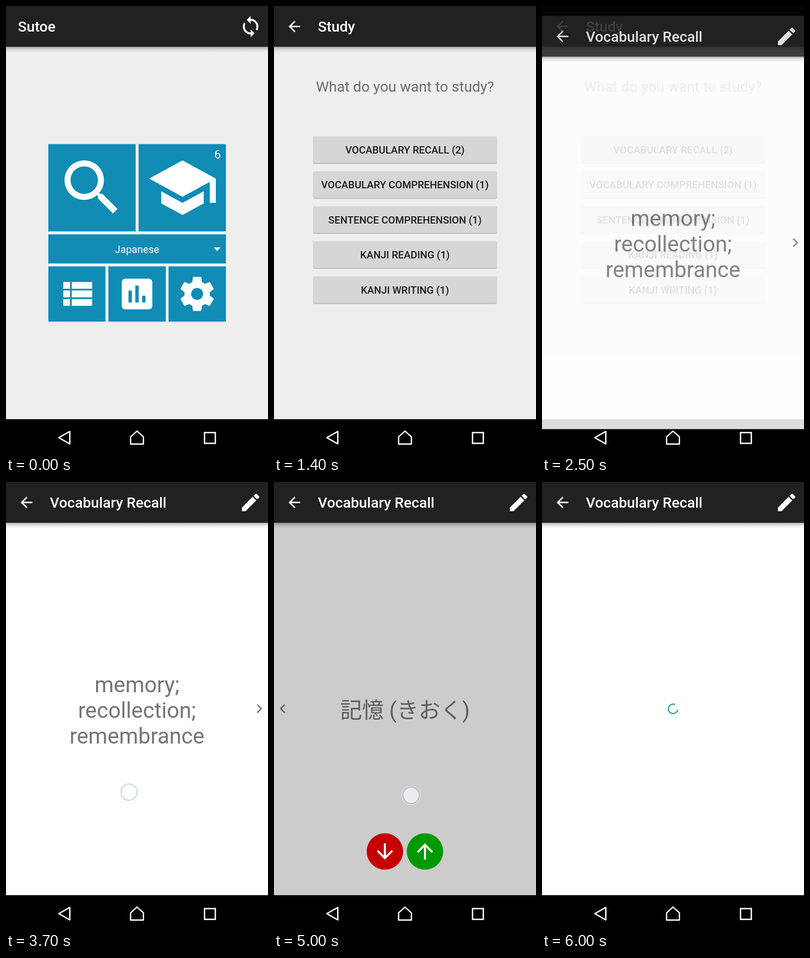
An HTML page that plays this animation: 573x978 px, repeating every 6.1 s.

```html
<!DOCTYPE html>
<html lang="ja">
<head>
<meta charset="utf-8">
<style>
  html, body { margin: 0; width: 100%; height: 100%; overflow: hidden; background: #000; }
  svg { display: block; font-family: Roboto, "Noto Sans CJK JP", "Noto Sans CJK", sans-serif; }
  .mid { text-anchor: middle; }
  .bold { font-weight: 500; }
  .line { fill: none; stroke-width: 3; }
</style>
</head>
<body>
<svg id="stage" width="573" height="978" viewBox="0 0 573 978"></svg>
<script>
const LOOP = 6100, STEP = 100, W = 573, BODY = 813;
const stage = document.getElementById('stage');

// Icons on a 24-unit grid
const ICONS = {
  back: 'M20 11H7.83l5.59-5.59L12 4l-8 8 8 8 1.41-1.41L7.83 13H20z',
  sync: 'M12 4V1L8 5l4 4V6c3.31 0 6 2.69 6 6 0 1.01-.25 1.97-.7 2.8l1.46 1.46C19.54 15.03 20 13.57 20 12c0-4.42-3.58-8-8-8zm0 14c-3.31 0-6-2.69-6-6 0-1.01.25-1.97.7-2.8L5.24 7.74C4.46 8.97 4 10.43 4 12c0 4.42 3.58 8 8 8v3l4-4-4-4z',
  edit: 'M3 17.25V21h3.75L17.81 9.94l-3.75-3.75zM20.71 7.04c.39-.39.39-1.02 0-1.41l-2.34-2.34c-.39-.39-1.02-.39-1.41 0l-1.83 1.83 3.75 3.75z',
  search: 'M15.5 14h-.79l-.28-.27C15.41 12.59 16 11.11 16 9.5 16 5.91 13.09 3 9.5 3S3 5.91 3 9.5 5.91 16 9.5 16c1.61 0 3.09-.59 4.23-1.57l.27.28v.79l5 4.99L20.49 19zm-6 0C7.01 14 5 11.99 5 9.5S7.01 5 9.5 5 14 7.01 14 9.5 11.99 14 9.5 14z',
  school: 'M5 13.18v4L12 21l7-3.82v-4L12 17zM12 3L1 9l11 6 9-4.91V17h2V9z',
  list: 'M4 5h4v4H4zm0 5h4v4H4zm0 5h4v4H4zM9 5h12v4H9zm0 5h12v4H9zm0 5h12v4H9z',
  chart: 'M19 3H5c-1.1 0-2 .9-2 2v14c0 1.1.9 2 2 2h14c1.1 0 2-.9 2-2V5c0-1.1-.9-2-2-2zM9 17H7v-7h2zm4 0h-2V7h2zm4 0h-2v-4h2z'
};

const icon = (name, cx, cy, scale, turn = 0) =>
  `<path d="${ICONS[name]}" fill="#fff" transform="translate(${cx} ${cy}) rotate(${turn}) scale(${scale}) translate(-12 -12)"/>`;
const rect = (x, y, w, h, fill, more = '') =>
  `<rect x="${x}" y="${y}" width="${w}" height="${h}" fill="${fill}" ${more}/>`;
const text = (s, x, y, size, fill, cls = '') =>
  `<text x="${x}" y="${y}" font-size="${size}" fill="${fill}" class="${cls}">${s}</text>`;
const tile = (x, y, w, h) => rect(x, y, w, h, '#108cb5');

const gear = (cx, cy, scale) => {
  let teeth = '';
  for (let a = 0; a < 360; a += 60)
    teeth += `<path d="M-2.9-6.7l.4-2.9q.1-.4.5-.4h4q.4 0 .5.4l.4 2.9z" fill="#fff" transform="rotate(${a})"/>`;
  return `<g transform="translate(${cx} ${cy}) scale(${scale})">
    <circle r="5.5" fill="none" stroke="#fff" stroke-width="4"/>${teeth}</g>`;
};

const header = (title, x) =>
  rect(0, -100, W, 100, '#000') + rect(0, 0, W, 89, '#212121') +
  rect(0, 89, W, 12, 'url(#shade)') + text(title, x, 56, 31.83, '#fff', 'bold') +
  (x > 50 ? icon('back', 44.7, 44.7, 1.59) : '');

const body = fill => rect(0, 89, W, BODY, fill);

const home = body('#eee') + header('Sutoe', 26) + icon('sync', 535, 45, 2.122) +
  tile(92.5, 301.5, 191, 190.5) + tile(290, 301.5, 191, 190.5) + tile(92.5, 498.5, 388.5, 63.5) +
  tile(92.5, 568.5, 125, 120.5) + tile(224, 568.5, 125.5, 120.5) + tile(355.5, 568.5, 125.5, 120.5) +
  icon('search', 187.7, 396.7, 6.63) + icon('school', 386, 396.7, 6.63) +
  text('6', 469.8, 333, 25.5, '#fff" text-anchor="end') +
  text('Japanese', 286.5, 539, 22.5, '#fff', 'mid') +
  '<path d="M454 527h15l-7.5 8z" fill="#fff"/>' +
  icon('list', 155, 628.5, 3.714) + icon('chart', 286.5, 628.8, 3.714) + gear(418, 628.5, 3.714);

const choices = ['VOCABULARY RECALL (2)', 'VOCABULARY COMPREHENSION (1)',
  'SENTENCE COMPREHENSION (1)', 'KANJI READING (1)', 'KANJI WRITING (1)'];
const study = body('#eee') + header('Study', 96) +
  text('What do you want to study?', 286.5, 187, 31.83, '#6d6d6d', 'mid') +
  choices.map((label, i) => {
    const y = 284.3 + i * 76.4;
    return rect(85, y + 1, 403, 60, '#000', 'rx="4" opacity=".1"') +
      rect(85.5, y + 1, 402, 58.8, '#000', 'rx="3.5" opacity=".12"') +
      rect(85, y, 403, 58, '#d6d6d6', 'rx="3"') +
      (i ? '' : rect(85, y, 403, 58, '#000', 'rx="3" id="press"')) +
      text(label, 286.5, y + 37.7, 22.28, '#1c1c1c', 'mid bold');
  }).join('');

const question = ['memory;', 'recollection;', 'remembrance']
  .map((s, i) => text(s, 286.5, 458.7 + i * 56, 47.75, '#757575', 'mid')).join('') +
  '<path class="line" stroke="#757575" d="M549.5 486l8.8 8.8-8.8 8.8"/>';

const disc = (cx, fill, turn) =>
  `<circle cx="${cx}" cy="806.5" r="39.8" fill="${fill}"/>` + icon('back', cx, 806.5, 2.22, turn);
const answer = body('#ccc') +
  text('記憶 (きおく)', 286.5, 514.5, 47.75, '#5e5e5e', 'mid') +
  '<path class="line" stroke="#5e5e5e" d="M23.5 486l-8.8 8.8 8.8 8.8"/>' +
  disc(242.5, '#c60000', -90) + disc(330.2, '#009a00', 90);

const recall = body('#fff') + `<g clip-path="url(#view)">
    <g id="question">${question}</g><g id="answer">${answer}</g>
    <circle id="spinner" cx="286.7" cy="495.2" r="10.4" fill="none" stroke="#148f8e" stroke-width="2.2" pathLength="360"/>
  </g>` + header('Vocabulary Recall', 96) + icon('edit', 535, 44.7, 2.122);

stage.innerHTML = `<defs>
    <linearGradient id="shade" x2="0" y2="1">
      <stop stop-opacity=".32"/><stop offset=".4" stop-opacity=".12"/><stop offset="1" stop-opacity="0"/>
    </linearGradient>
    <clipPath id="view">${body('#000')}</clipPath>
  </defs>
  <g>${home}</g><g id="study">${study}</g><g id="recall">${recall}</g>
  <g class="line" stroke="#fff" stroke-linejoin="round">
    <path d="M115.5 942.3L139.5 928.8V956z"/>
    <path d="M272.5 956.2V940.5L286.5 928l14 12.5V956.2z"/>
    <path d="M434.2 931.2h23.6v23.6h-23.6z" stroke-linejoin="miter"/>
  </g>
  <g id="touch">
    <circle r="20" fill="none" stroke="#fff" stroke-width="3" opacity=".25"/>
    <circle r="17.7" fill="#fff" fill-opacity=".65" stroke="#7891c8" stroke-opacity=".45" stroke-width="2"/>
  </g>`;

const el = id => document.getElementById(id);
const set = (id, attrs) => { for (const k in attrs) el(id).setAttribute(k, attrs[k]); };
const clamp = v => Math.min(1, Math.max(0, v));
const smooth = v => { v = clamp(v); return v * v * (3 - 2 * v); };

// A screen rises 78 px into place while fading in
function enter(id, age) {
  const y = 78 * (1 - clamp(age / 350)) ** 5;
  set(id, { opacity: 1 - (1 - clamp(age / 200)) ** 4, transform: `translate(0 ${y})` });
}

// Finger position and strength: [x, y, opacity]
function finger(t, swipe, lift) {
  if (t >= 800 && t < 1200) return [392, 383, t < 1100 ? .8 : .2];
  if (t >= 2100 && t < 2500) return [290, 318, t < 2400 ? .9 : .2];
  if (t >= 3700 && t < 3900) return [269 - swipe, 677, 1];
  if (t >= 5000 && t < 5300) return [300, 684 - lift, 1];
  return [0, 0, 0];
}

function draw(t) {
  enter('study', t - 1122);
  enter('recall', t - 2421);
  set('press', { opacity: t >= 2200 ? .07 : 0 });

  const swipe = W * smooth((t - 3700) / 300);
  const lift = BODY * smooth((t - 5000) / 600);
  set('question', { transform: `translate(${-swipe} 0)`, opacity: t < 4000 ? 1 : 0 });
  set('answer', { transform: `translate(${W - swipe} ${-lift})` });

  const k = clamp((t - 5600) / 400);
  set('spinner', {
    opacity: k > 0 ? 1 : 0,
    'stroke-dasharray': `${285 * smooth(k)} 400`,
    transform: `rotate(${10 - 90 * (1 - k)} 286.7 495.2)`
  });

  const [x, y, opacity] = finger(t, swipe, lift);
  set('touch', { transform: `translate(${x} ${y})`, opacity });
}

const start = performance.now();
function tick() {
  const t = (performance.now() - start) % LOOP;
  draw(Math.floor(t / STEP) * STEP);
  requestAnimationFrame(tick);
}
tick();
</script>
</body>
</html>
```
